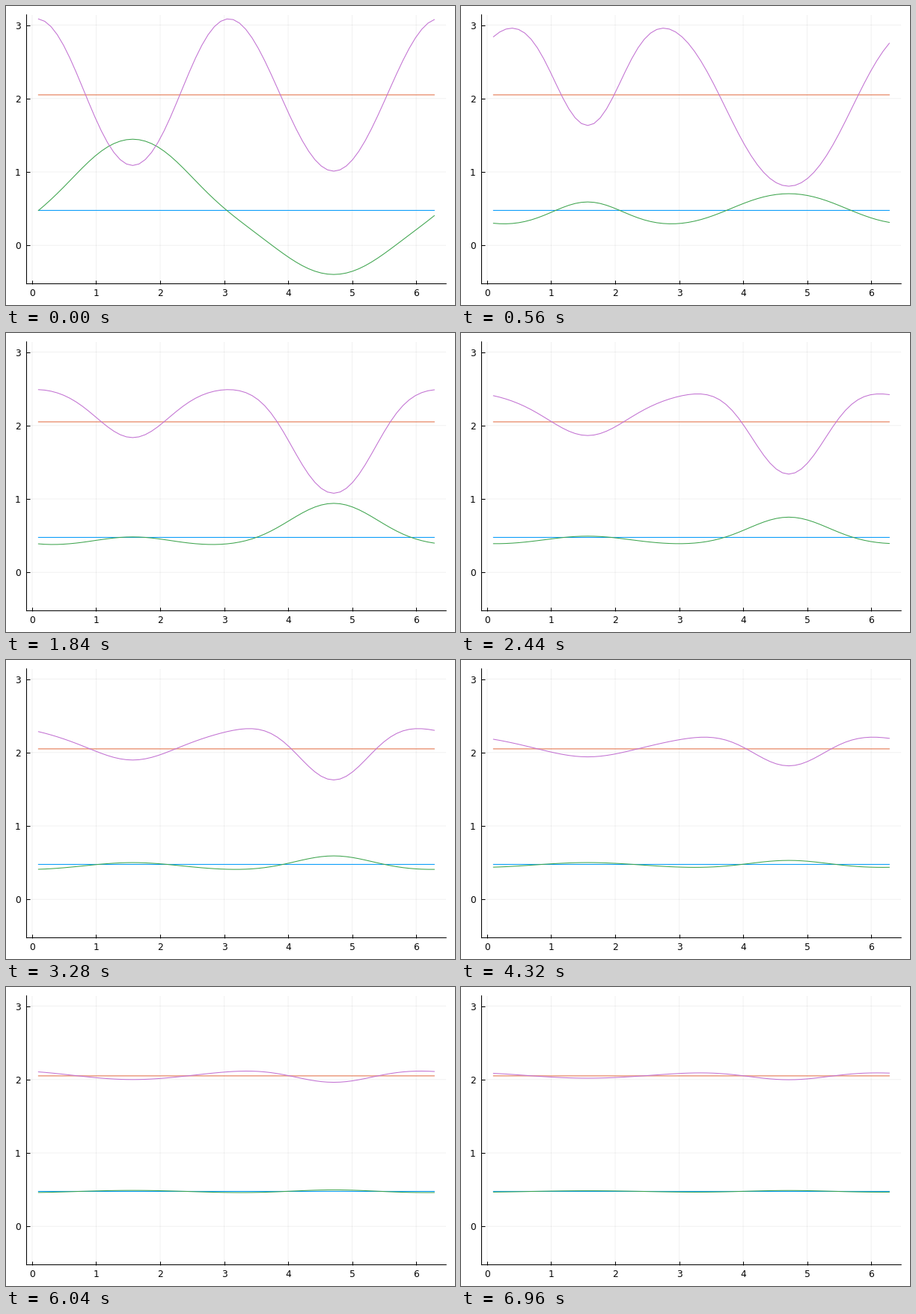
These frames come from a looping animation (600 by 400 pixels, 7 s). A matplotlib script:

```python
import numpy as np
import matplotlib.pyplot as plt
from matplotlib.animation import FuncAnimation

W, H, DPI = 600, 400, 100
FRAMES, INTERVAL = 175, 40

# Schnakenberg reaction-diffusion system on a periodic domain
A, B = 0.05, 2.0
DU, DV = 1.0, 0.1
N = 64
DX = 2 * np.pi / N
DT, EVERY = 0.004, 10

x = DX * np.arange(1, N + 1)
v_eq = A + B
u_eq = B / v_eq**2


def laplacian(f):
    return (np.roll(f, 1) - 2 * f + np.roll(f, -1)) / DX**2


def step(u, v):
    growth = u * v**2
    return (u + DT * (B - growth + DU * laplacian(u)),
            v + DT * (A - v + growth + DV * laplacian(v)))


def simulate():
    u, v = u_eq + np.sin(x), v_eq + np.cos(2 * x)
    states = [(u, v)]
    for _ in range(FRAMES * EVERY - 1):
        u, v = step(u, v)
        states.append((u, v))
    return states[EVERY - 1::EVERY]


history = simulate()

plt.rcParams["font.family"] = "DejaVu Sans"
fig = plt.figure(figsize=(W / DPI, H / DPI), dpi=DPI, facecolor="white")
left, right, top, bottom = 27.5, 588.2, 11.8, 371.6
ax = fig.add_axes([left / W, 1 - bottom / H,
                   (right - left) / W, (bottom - top) / H])

pad = 0.03 * (x[-1] - x[0])
ax.set_xlim(x[0] - pad, x[-1] + pad)
ax.set_ylim(u_eq - 1, 3.141)
ax.set_xticks(range(7))
ax.set_yticks(range(4))
ax.set_axisbelow(True)
ax.grid(color="black", alpha=0.08, linewidth=0.5, snap=False)
ax.tick_params(direction="in", length=3.4, width=0.75, labelsize=8.8)
ax.tick_params(axis="x", pad=4.9)
ax.tick_params(axis="y", pad=5.5)
for side in ("top", "right"):
    ax.spines[side].set_visible(False)
for side in ("left", "bottom"):
    ax.spines[side].set(linewidth=0.75, snap=False)


def curve(y, color):
    return ax.plot(x, y, color=color, linewidth=0.75, snap=False)[0]


curve(np.full(N, u_eq), "#009afa")
curve(np.full(N, v_eq), "#e26f46")
u_line = curve(history[0][0], "#3da44d")
v_line = curve(history[0][1], "#c271d2")


def update(i):
    u, v = history[i]
    u_line.set_ydata(u)
    v_line.set_ydata(v)
    return u_line, v_line


anim = FuncAnimation(fig, update, frames=FRAMES, interval=INTERVAL,
                     repeat=True, repeat_delay=0, cache_frame_data=False)
plt.show()
```
